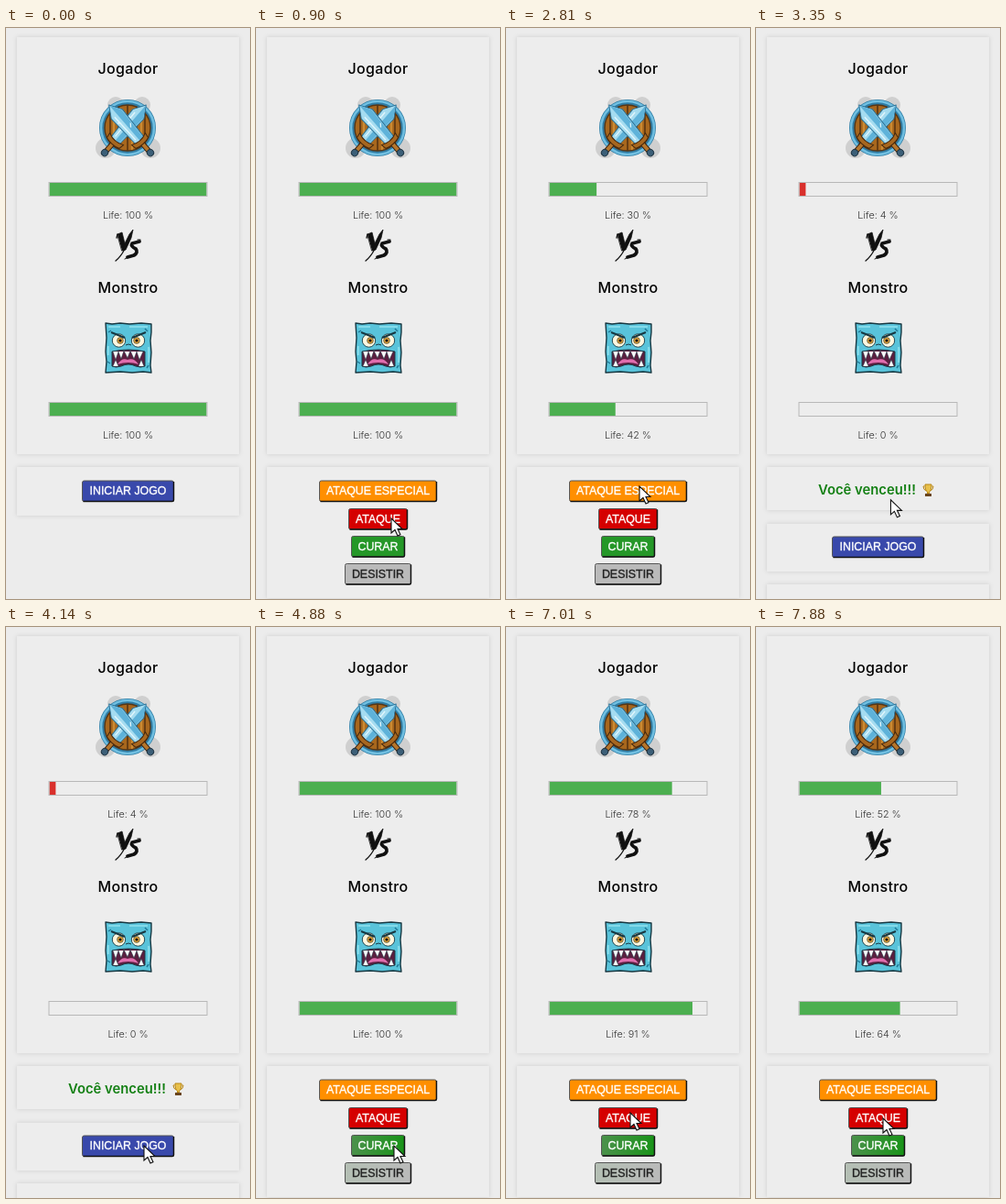
An HTML page that plays this animation: 267 px wide and 623 px high, repeating every 8000 ms.

```html
<!DOCTYPE html>
<html lang="pt">
<head>
<meta charset="utf-8">
<style>
html, body { margin: 0; width: 100%; height: 100%; overflow: hidden; background: #ececec; }
svg { display: block; }
text { font-family: Inter, sans-serif; text-anchor: middle; }
.title { font-size: 16px; font-weight: 500; letter-spacing: .35px; }
.life { font-size: 10.8px; font-weight: 300; fill: #333; }
.button text { font: 12.4px "Liberation Sans", Arial, sans-serif; stroke-width: .35px; }
.panel { fill: #ededed; filter: drop-shadow(0 0 2.5px #0002); }
</style>
</head>
<body>
<svg width="267" height="623" viewBox="0 0 267 623">
  <defs>
    <linearGradient id="heal"><stop stop-color="#4b914b"/><stop offset="1" stop-color="#189318"/></linearGradient>
    <linearGradient id="quit"><stop stop-color="#b4bfb4"/><stop offset="1" stop-color="#bababa"/></linearGradient>
    <g id="sword" stroke-linejoin="round">
      <path d="M-6 15L-8-24 0-37 8-24 6 15Z" fill="#a5dcf0" stroke="#2b7399" stroke-width="1"/>
      <path d="M0-36L7-24 5 14H0Z" fill="#5eb2d9"/>
      <path d="M-4-23L-3 11M-6-16l3 3M5-7l-3 4" fill="none" stroke="#e2f6fc" stroke-width="1.3"/>
      <path d="M-2.5 17h5v13h-5Z" fill="#b5762c" stroke="#3b2210"/>
      <path d="M-10 12Q0 17 10 12L9 18Q0 21-9 18Z" fill="#a7671f" stroke="#432710"/>
      <circle cy="32" r="3.6" fill="#3c5f78" stroke="#1d3342"/>
    </g>
  </defs>
  <rect class="panel" x="12" y="10" width="243" height="455"/>
  <text class="title" x="133.5" y="50">Jogador</text>
  <text class="title" x="133.5" y="289">Monstro</text>

  <g transform="translate(133 109)">
    <g fill="#cfcfcf">
      <circle cx="-13" cy="-25" r="9"/><circle cx="16" cy="-25" r="9"/>
      <circle cx="-24" cy="22" r="11"/><circle cx="25" cy="22" r="11"/>
    </g>
    <circle r="28" fill="#a8671d" stroke="#2f7ca4" stroke-width="6"/>
    <circle r="29" fill="none" stroke="#70bfe1" stroke-width="2.6"/>
    <path d="M-19-17V17M-10-23V23M0-25V25M10-23V23M19-17V17" stroke="#593512" stroke-width="1.6"/>
    <path d="M-15-18V17M5 6V24M15-16V18" stroke="#cc8a31" stroke-width="2.4"/>
    <circle r="25" fill="none" stroke="#553616" stroke-width="1.4"/>
    <use href="#sword" transform="translate(-4 3) rotate(41)"/>
    <use href="#sword" transform="translate(4 3) rotate(-41)"/>
  </g>

  <g fill="#111" stroke="#111" stroke-linecap="round">
    <path d="M122 225l5-2 3 12 5-10 4-5-2 9-6 13-4 1Z" stroke-width=".8"/>
    <path d="M130 241Q126 249 120 254M121 229l1-4" fill="none" stroke-width="1.3"/>
    <path d="M146 233L138 235Q136 238 142 241Q145 245 140 248L133 250" fill="none" stroke-width="3.8" stroke-linejoin="round"/>
    <path d="M144 231l3 0M132 251l-2 1" fill="none"/>
  </g>

  <g stroke="#173842" stroke-linejoin="round">
    <path d="M109 322l7 1 9-1 10 1 13-1 11 1v9l-1 9 1 13-1 14 1 8-9-1-12 1-13-1-16 1 1-12-1-11 1-15Z" fill="#59c3da" stroke-width="1.4"/>
    <path d="M112 326h13M135 326h20M112 347v10M156 348v17" stroke="#91e2ee" stroke-width="1.5" fill="none"/>
    <path d="M112 332l3-2M152 328l3 3M111 364l3 2M154 371l2-3" stroke="#217a98" stroke-width="1.5"/>
    <g fill="#fff7df" stroke-width=".9"><circle cx="123.5" cy="341" r="7.2"/><circle cx="144.5" cy="341" r="7.2"/></g>
    <g fill="#eca635" stroke-width=".6"><circle cx="125" cy="341" r="3.4"/><circle cx="143" cy="341" r="3.4"/></g>
    <g fill="#111" stroke="none"><circle cx="125" cy="341" r="1.6"/><circle cx="143" cy="341" r="1.6"/></g>
    <path d="M115 332l15 6M153 332l-15 6" stroke-width="2.2" fill="none"/>
    <path d="M131 346q3-2 6 0" fill="none"/>
    <path d="M116 353Q134 349 152 353V369Q147 371 142 369Q134 365 126 369Q120 371 116 369Z" fill="#5b1f40" stroke-width="1"/>
    <path d="M122 367q5-8 11-5 7-3 12 5-11-4-23 0Z" fill="#e06eae" stroke="none"/>
    <path d="M117 353l3 9 3-9 3 8 3-9 4 8 3-8 4 9 3-8 3 9 4-9M117 369l3-7 3 7M145 369l3-7 3 7" fill="#fff" stroke-width=".5"/>
  </g>

  <g id="bars"></g>
  <g id="controls"></g>
  <circle id="click" r="12" fill="#ffbd16" opacity=".65"/>
  <path id="cursor" d="M0 0V16L4 12.5 7 19 10 17.7 7 11.5H12Z" fill="#fff" stroke="#111" stroke-width="1.1"/>
</svg>
<script>
const $ = id => document.getElementById(id);
const LOOP = 8000;

// time, player life, monster life, screen
const states = [
  [0, 100, 100, 'start'], [620, 100, 100, 'fight'],
  [1370, 90, 93, 'fight'], [1770, 82, 86, 'fight'],
  [1980, 72, 78, 'fight'], [2120, 62, 69, 'fight'], [2260, 51, 60, 'fight'],
  [2400, 41, 51, 'fight'], [2540, 30, 42, 'fight'],
  [2950, 21, 28, 'fight'], [3090, 13, 14, 'fight'], [3230, 4, 0, 'won'],
  [4750, 100, 100, 'again'], [6680, 89, 96, 'again'], [6880, 78, 91, 'again'],
  [7270, 69, 82, 'again'], [7480, 61, 73, 'again'], [7690, 52, 64, 'again']
];

// time, cursor tip
const path = [
  [200, 165, 623], [480, 148, 505], [690, 148, 505], [900, 148, 535],
  [2540, 148, 535], [2740, 146, 500], [3230, 146, 500], [3610, 152, 562],
  [4020, 152, 562], [4140, 151, 566], [5460, 151, 566], [5670, 149, 586],
  [5870, 142, 567], [6330, 142, 567], [6610, 136, 530], [7200, 136, 530],
  [7340, 139, 536], [8000, 139, 536]
];
const clicks = [600, 1350, 1790, 2010, 2160, 2300, 2440, 2940, 3080, 3220, 4750, 6680, 6860, 7270, 7480, 7690];

const panel = (y, h) => `<rect class="panel" x="12" y="${y}" width="243" height="${h}"/>`;

function button(x, y, w, fill, label, ink = '#fff') {
  const left = x + .5, right = x + w - .5, top = y + .5, bottom = y + 23;
  return `<g class="button">
    <rect x="${left}" y="${top}" width="${w - 1}" height="22.5" rx="2" fill="${fill}" stroke="#555" stroke-width="1"/>
    <path d="M${left + 1} ${bottom}H${right - 1.5}Q${right} ${bottom} ${right} ${bottom - 1.5}V${top + 1}"
      fill="none" stroke="#111" stroke-width="1.5"/>
    <text x="${x + w / 2}" y="${y + 15.8}" style="fill:${ink};stroke:${ink}">${label}</text></g>`;
}

const startButton = y => button(83, y, 101, '#3949ab', 'INICIAR JOGO');

const trophy = `<g transform="translate(188.5 504)" fill="none" stroke="#b88615">
  <path d="M-4-4h-1.5q0 4 3.5 5M4-4h1.5q0 4-3.5 5" stroke-width="1"/>
  <path d="M-3.5-6h7q0 7-2.5 8v2h-2v-2q-2.5-1-2.5-8Z" fill="#e8c04a"/>
  <path d="M-3.5 5.5h7" stroke="#69441c" stroke-width="3"/></g>`;

function fightButtons(tinted) {
  return panel(479, 143) +
    button(69, 493.5, 129, '#ff8f00', 'ATAQUE ESPECIAL') +
    button(101, 524, 65, '#d50000', 'ATAQUE') +
    button(104, 554, 59, tinted ? 'url(#heal)' : '#259728', 'CURAR') +
    button(97, 584, 73, tinted ? 'url(#quit)' : '#bababa', 'DESISTIR', '#222');
}

const screens = {
  start: panel(479, 53) + startButton(493.5),
  fight: fightButtons(false),
  again: fightButtons(true),
  won: panel(479, 47) +
    '<text x="121.5" y="509" font-size="14.8" font-weight="600" fill="#148014">Você venceu!!!</text>' +
    trophy + panel(541, 52) + startButton(554.5) + panel(607, 40)
};

function lifeBar(y, life) {
  const color = life < 20 ? '#d9302c' : '#4caf50';
  return `<rect x="47" y="${y}" width="173" height="15" fill="#ededed"/>
    <rect x="47.5" y="${y}" width="${1.72 * life}" height="14.5" fill="${color}"/>
    <rect x="47" y="${y - .5}" width="173" height="15" fill="none" stroke="#b8b8b8"/>
    <text class="life" x="133.5" y="${y + 39}">Life: ${life} %</text>`;
}

function cursorAt(t) {
  const i = path.findIndex(p => p[0] > t);
  if (i < 1) return path[i < 0 ? path.length - 1 : 0].slice(1);
  const [a, b] = [path[i - 1], path[i]];
  const u = (t - a[0]) / (b[0] - a[0]);
  const e = u * u * (3 - 2 * u);
  return [a[1] + (b[1] - a[1]) * e, a[2] + (b[2] - a[2]) * e];
}

let shown;
function draw(now) {
  const t = now % LOOP;
  const state = states.findLast(s => s[0] <= t);
  if (state !== shown) {
    const [, player, monster, screen] = state;
    $('bars').innerHTML = lifeBar(169, player) + lifeBar(409, monster);
    $('controls').innerHTML = screens[screen];
    shown = state;
  }
  const [x, y] = cursorAt(t);
  $('cursor').setAttribute('transform', `translate(${x} ${y})`);
  $('cursor').style.display = t < 200 ? 'none' : '';
  $('click').setAttribute('transform', `translate(${x} ${y})`);
  $('click').style.display = clicks.some(c => t >= c && t < c + 110) ? '' : 'none';
  requestAnimationFrame(draw);
}
draw(performance.now());
</script>
</body>
</html>
```
